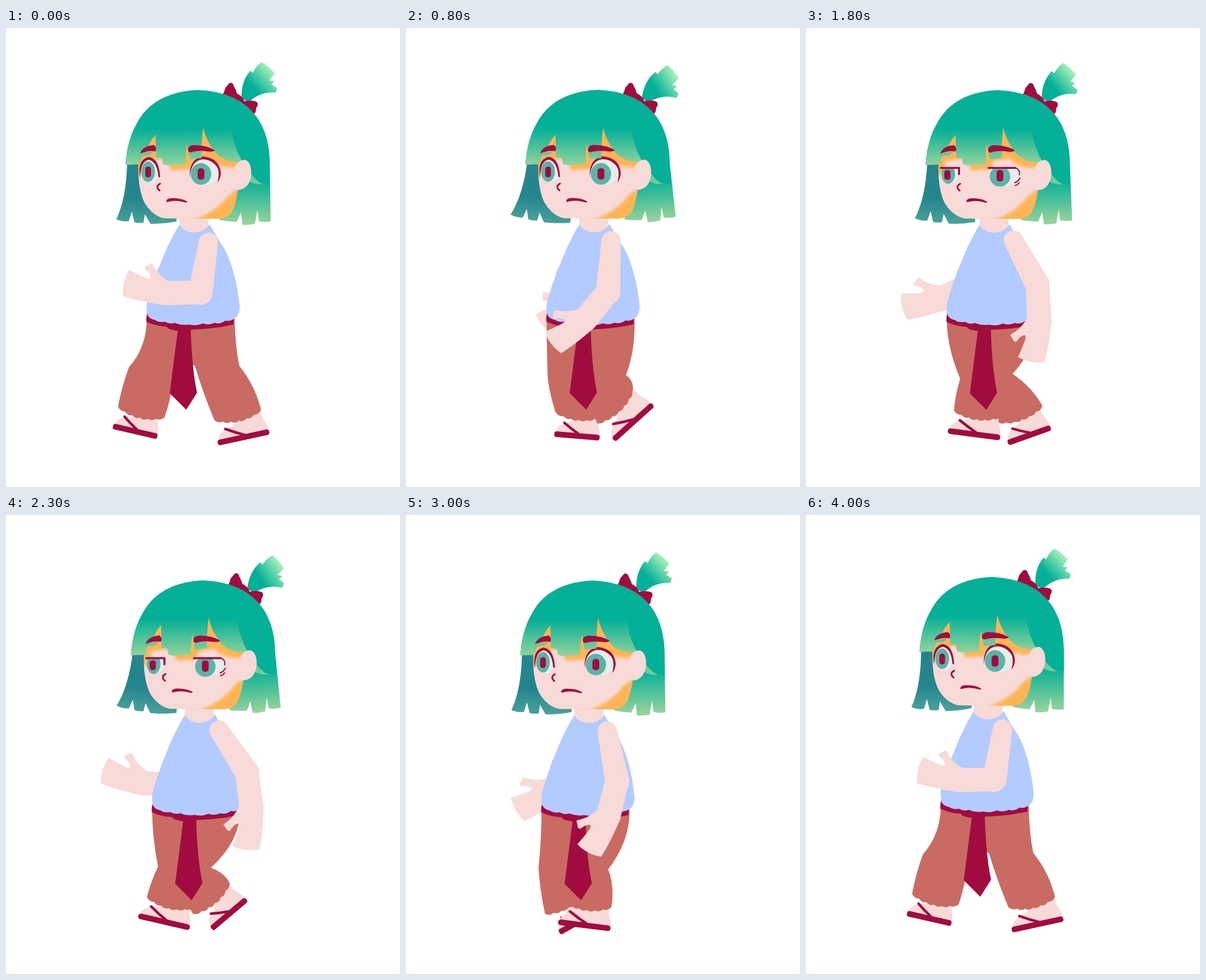
Animation, 693 px wide and 808 px high, one loop 4.1 s. Source, as an HTML page:

```html
<!DOCTYPE html>
<html lang="en">
<head>
<meta charset="utf-8">
<title>Walk</title>
<style>
html, body { margin: 0; width: 100%; height: 100%; overflow: hidden; background: #fff; }
svg { display: block; width: 693px; height: 808px; }
.skin { fill: #f8dad8; }
.wine { fill: #a20b40; }
.line { fill: none; stroke: #a20b40; stroke-linecap: round; stroke-linejoin: round; }
.hair { fill: #04b097; }
.pants { fill: #c96b63; }
.iris { fill: #5cb3a8; }
.white { fill: #e5eeea; }
</style>
</head>
<body>
<svg viewBox="0 0 693 808">
  <defs>
    <linearGradient id="bangs" gradientUnits="userSpaceOnUse" x1="0" y1="178" x2="0" y2="242">
      <stop stop-color="#04b097"/><stop offset="1" stop-color="#96d39b"/>
    </linearGradient>
    <linearGradient id="back" gradientUnits="userSpaceOnUse" x1="0" y1="268" x2="0" y2="345">
      <stop stop-color="#04b097"/><stop offset="1" stop-color="#98d39b"/>
    </linearGradient>
    <linearGradient id="lock" gradientUnits="userSpaceOnUse" x1="0" y1="300" x2="0" y2="348">
      <stop stop-color="#25858f"/><stop offset="1" stop-color="#4ba49a"/>
    </linearGradient>
    <linearGradient id="tail" gradientUnits="userSpaceOnUse" x1="434" y1="103" x2="464" y2="74">
      <stop stop-color="#04b097"/><stop offset="1" stop-color="#a0efb6"/>
    </linearGradient>
    <filter id="soft" x="-10%" y="-10%" width="120%" height="120%"><feGaussianBlur stdDeviation="2.6"/></filter>
    <clipPath id="faceClip"><use href="#face"/></clipPath>
    <clipPath id="lidClip"><path d="M220 247H390V290H220Z"/></clipPath>
    <path id="fore" d="M-16 -21L-57 -21Q-72 -30 -80 -43Q-83 -48 -85 -52L-97 -46L-98 -42Q-86 -33 -87 -26Q-89 -24 -95 -26Q-110 -32 -125 -40Q-138 -20 -136 6Q-114 14 -64 22L8 20Q22 10 20 0Q14 -21 -16 -21Z"/>
    <g id="foot">
      <path class="skin" d="M-38 -4Q-36 -15 -26 -19Q-2 -25 4 -48L36 -48Q31 -31 38 -16L40 -4Z"/>
      <path class="line" stroke-width="4.5" d="M-24 -21Q-12 -12 2 -4"/>
      <rect class="wine" x="-40" y="-5" width="80" height="10" rx="4"/>
    </g>
  </defs>

  <g id="figure">
    <use id="farArm" href="#fore" class="skin"/>
    <use id="farFoot" href="#foot"/>
    <path id="farLeg" class="pants"/>
    <use id="nearFoot" href="#foot"/>
    <path id="nearLeg" class="pants"/>

    <path class="wine" d="M249 500Q246 509 247 517Q263 525 283 526Q284 531 302 533L288 643L317 672L336 642Q327 600 325 531Q365 530 400 522L401 510Z"/>
    <path class="skin" d="M305 325H356V352Q345 366 318 362L305 354Z"/>
    <path fill="#b3cbff" d="M305 346Q312 359 330 360Q350 359 358 345Q367 362 385 390Q405 430 411 490Q411 507 401 512Q394 517 386 515Q377 522 367 519Q357 524 346 520Q336 525 322 522Q308 524 297 519Q288 522 279 517Q269 519 262 514Q252 512 249 505Q246 495 248 484Q255 458 262 440Q265 428 270 419Q285 379 305 346Z"/>

    <path id="sideLock" fill="url(#lock)" d="M213 236Q213 300 196 338Q206 343 218 341L223 324L228 343Q236 345 244 343L246 328L256 345Q280 345 302 340L300 300L240 236Z"/>
    <path id="backHair" fill="url(#back)" d="M464 235L464 342Q453 344 443 341L441 321L436 346Q425 348 414 347L412 325L404 342Q390 341 374 338L385 250Z"/>
    <path id="pony" fill="url(#tail)" d="M414 125Q412 95 428 75L433 78Q438 66 447 59Q460 66 471 78L462 91L471 92L466 98L476 104L474 112Q445 111 428 130Z"/>
    <path class="wine" d="M381 118Q384 112 386 105L393 97Q399 95 401 103Q405 110 406 115Q416 120 419 129Q432 126 441 130Q445 135 440 141Q440 152 434 151L420 146L390 124Z"/>
    <path class="hair" d="M210 241Q213 200 228 172Q256 113 337 109Q410 112 442 158Q464 190 464 240L464 275L397 262L300 200Z"/>
    <path fill="#70cc99" d="M430 255Q439 269 452 275Q438 276 428 270Z"/>
    <path id="face" fill="#ffb555" d="M233 230Q231 283 244 308Q257 330 278 335L374 336Q392 335 399 320Q406 303 408 283L412 238L384 200L345 170L255 180Z"/>
    <g clip-path="url(#faceClip)">
      <path class="skin" filter="url(#soft)" d="M228 262L240 255L246 234L286 229L289 250L324 249L330 234L358 230Q372 247 404 246L440 240L420 281Q400 284 390 297Q367 326 324 340L240 345L215 300Z"/>
    </g>
    <g id="open">
      <ellipse class="white" cx="254" cy="252" rx="16" ry="21"/>
      <ellipse class="iris" cx="250" cy="253" rx="12" ry="18"/>
      <rect class="wine" x="245" y="244" width="10" height="19" rx="4.5"/>
      <path class="wine" d="M236 264Q230 232 251 227Q270 230 271 263L268 262Q266 235 251 232Q236 235 236 264Z"/>
      <ellipse class="white" cx="350" cy="254" rx="26" ry="22"/>
      <ellipse class="iris" cx="343" cy="257" rx="18" ry="19"/>
      <rect class="wine" x="337" y="247" width="12" height="20" rx="5"/>
      <path class="wine" d="M323 263Q322 230 346 226Q376 229 378 256Q377 266 372 272Q377 252 370 243Q360 231 346 231Q326 233 323 263Z"/>
    </g>
    <g id="tired">
      <g clip-path="url(#lidClip)">
        <ellipse class="white" cx="254" cy="253" rx="16" ry="20"/>
        <ellipse class="iris" cx="250" cy="256" rx="12" ry="18"/>
        <rect class="wine" x="243" y="250" width="11" height="17" rx="4.5"/>
        <ellipse class="white" cx="350" cy="256" rx="26" ry="22"/>
        <ellipse class="iris" cx="341" cy="261" rx="18" ry="18"/>
        <rect class="wine" x="335" y="250" width="12" height="20" rx="5"/>
      </g>
      <path class="line" stroke-width="3.6" d="M237 246H269L269 257M321 246H368"/>
      <path class="line" stroke-width="2" d="M368 246Q377 249 375 258M376 264Q373 270 367 272M375 272Q372 276 368 277"/>
    </g>
    <path fill="url(#bangs)" d="M210 241Q213 200 228 172L260 150H380L397 178Q402 212 416 236Q384 238 367 218Q351 197 347 175Q343 205 344 229L323 231L318 204Q315 222 316 240L285 242L276 240L274 229L264 228L263 188Q252 200 246 219L260 217L252 224L239 225L236 240Z"/>
    <path class="skin" d="M403 244Q408 232 421 232Q433 238 431 260Q428 282 410 285L400 283Z"/>
    <path class="wine" d="M236 221Q240 208 260 206Q266 210 263 217Q250 215 236 221ZM320 214Q321 206 332 206Q355 207 367 215Q365 219 352 217Q336 215 325 219Q320 219 320 214Z"/>
    <path class="line" stroke-width="3" d="M271 274Q262 279 270 286"/>
    <path class="wine" d="M282 305Q282 300 291 299.5Q310 299 319 306Q318 308 315 307Q299 302 285 306Q282 307 282 305Z"/>

    <path id="upperArm" class="skin"/>
    <use id="nearArm" href="#fore" class="skin"/>
  </g>
</svg>
<script>
const STEP = 100, STEPS = 41, STRIDE = 4000;
const { sin, cos, max, min, exp, hypot, PI } = Math;
const rad = deg => deg * PI / 180;
const $ = id => document.getElementById(id);
const place = (id, value) => $(id).setAttribute('transform', value);
const draw = (id, d) => $(id).setAttribute('d', d);

// soft bump over the stride, in degrees
const pulse = (deg, centre, width) => exp(-(((deg - centre) / width) ** 2));
const ramp = (deg, from, to) => {
  const u = max(0, min(1, (deg - from) / (to - from)));
  return u * u * (3 - 2 * u);
};

function hem(x1, y1, x2, y2) {
  const n = 6, len = hypot(x2 - x1, y2 - y1);
  const nx = (y1 - y2) / len, ny = (x2 - x1) / len;
  const at = (u, out) => `${x1 + (x2 - x1) * u + nx * out} ${y1 + (y2 - y1) * u + ny * out}`;
  const sag = u => 40 * u * (1 - u);
  let d = '';
  for (let i = 1; i <= n; i++) {
    const u = i / n, m = u - .5 / n;
    d += `Q${at(m, sag(m) + 5)} ${at(u, sag(u))}`;
  }
  return d;
}

// phase 0 is the heel strike; the sole rolls up at push-off
function leg(name, phase, { mid, reach, follow, hip, sole }) {
  const strike = max(0, cos(rad(phase)));
  const push = max(0, cos(rad(phase - 220)));
  const tilt = 13 * strike - 42 * push;
  const fx = mid - reach * cos(rad(phase)) + 25 * max(0, sin(rad(phase)));
  const fy = 723 - 13 * strike - 29 * push * push;

  const hx = fx + 48 * sin(rad(tilt)), hy = (fy - 34 + 676) / 2;
  const dx = 42 * cos(rad(tilt)), dy = 42 * sin(rad(tilt));
  const lx = hx - dx, ly = hy - dy, rx = hx + dx, ry = hy + dy;
  const kx = hip + follow * hx, ky = 618 - (hx - 320) ** 2 / 330;
  const a = kx - 39, b = kx + 39;

  draw(name + 'Leg', `M247.5 512Q247.5 562 ${a} ${ky}Q${(a + lx) / 2 - 3} ${(ky + ly) / 2} ${lx} ${ly}`
    + hem(lx, ly, rx, ry) + `Q${(b + rx) / 2 + 9} ${(ky + ry) / 2 - 4} ${b} ${ky}Q404 566 402 512Z`);
  place(name + 'Foot', `translate(${fx} ${fy}) rotate(${tilt}) scale(${sole} 1)`);
}

function arms(deg) {
  const half = rad(deg / 2);
  const swing = sin(half - .15 * sin(half));

  const sx = 356 + 9 * swing, sy = 377 - 4 * swing;
  const angle = rad(-9 + 43 * swing ** 3);
  const ex = sx + 90 * sin(angle), ey = sy + 90 * cos(angle);
  const nx = cos(angle), ny = -sin(angle), r = 17, R = 21.5;
  draw('upperArm', `M${sx - nx * r} ${sy - ny * r}A${r} ${r} 0 0 1 ${sx + nx * r} ${sy + ny * r}`
    + `L${ex + nx * R} ${ey + ny * R}A${R} ${R} 0 0 1 ${ex - nx * R} ${ey - ny * R}Z`);
  place('nearArm', `translate(${ex} ${ey}) rotate(${-97 * swing})`);

  const raise = pulse(deg, 205, 50);
  place('farArm', `translate(${375 - 82 * swing} ${425 + 45 * raise}) rotate(${-55 + 59 * raise})`);
}

function hair(deg) {
  const lift = 1.15 * pulse(deg, 62, 45) + pulse(deg, 205, 45);
  const hang = (id, x, turn) =>
    place(id, `translate(${x} 240) scale(1 ${1 - .05 * lift}) rotate(${turn * lift}) translate(${-x} -240)`);
  hang('sideLock', 225, 6.5);
  hang('backHair', 430, -5.5);
  place('pony', `rotate(${10.5 * lift} 420 128)`);
}

function pose(t) {
  const deg = t / STRIDE * 360;
  const rise = pulse(deg, 125, 30);
  const x = 11 * pulse(deg, 220, 35) - 2.5 * rise - 10.5 * ramp(deg, 225, 270);
  const y = 8.5 * pulse(deg, 240, 55) - 4 * rise;
  place('figure', `translate(${x} ${y})`);

  leg('far', deg - 4, { mid: 308, reach: 81, follow: .5, hip: 136, sole: 1 });
  leg('near', deg - 213, { mid: 342, reach: 74, follow: .58, hip: 135, sole: 1.16 });
  arms(deg);
  hair(deg);

  const tired = t >= 1500 && t < 2700;
  $('open').style.display = tired ? 'none' : '';
  $('tired').style.display = tired ? '' : 'none';
}

const start = performance.now();
let shown = -1;
function tick(now) {
  const step = Math.floor(max(0, now - start) / STEP) % STEPS;
  if (step !== shown) pose((shown = step) * STEP);
  requestAnimationFrame(tick);
}
pose(0);
requestAnimationFrame(tick);
</script>
</body>
</html>
```
